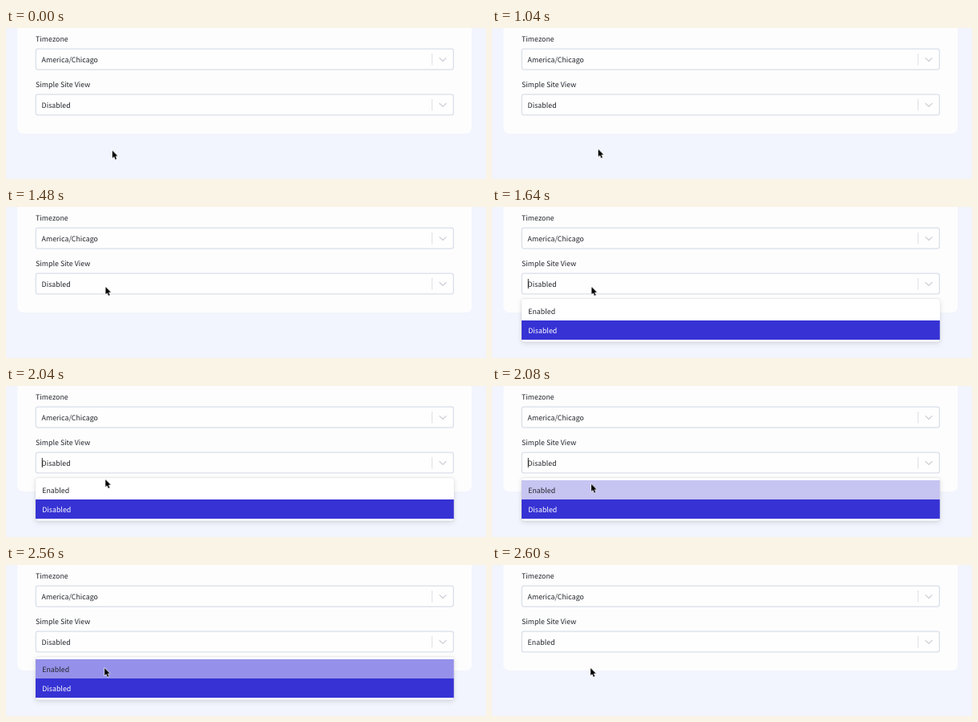
Write an HTML page that moves like this. It is 600 px wide and 189 px high and loops after 2720 ms.

```html
<!DOCTYPE html>
<html lang="en">
<head>
<meta charset="utf-8">
<title>Select menu</title>
<style>
  html, body { margin: 0; width: 100%; height: 100%; overflow: hidden; background: #f2f5fd; }
  svg { display: block; width: 100%; height: 100%; }
  text {
    font: 8.9px "Noto Sans CJK JP", "Noto Sans CJK SC", "Noto Sans CJK", "Open Sans", sans-serif;
    fill: #23252b;
    text-rendering: geometricPrecision;
  }
  .field { fill: #fefefe; stroke: #d9dfe8; stroke-width: 1.25; }
  .divider { stroke: #d3d6de; stroke-width: .8; }
  .chevron { fill: none; stroke: #cdd0d6; stroke-width: 1.3; stroke-linecap: round; stroke-linejoin: round; }
  .panel { fill: #fff; filter: drop-shadow(0 2.5px 3.2px rgba(0, 0, 0, .12)); }
  .edge { fill: none; stroke: rgba(0, 0, 0, .1); stroke-width: .6; }
  .selected { fill: #3632d4; }
  .light { fill: #fff; }

  .menu, .caret, .option, .before, .after, .cursor { animation: 2720ms step-end infinite; }
  .menu { animation-name: menu; }
  .caret { animation-name: caret; fill: #111; }
  .option { animation-name: option; }
  .before { animation-name: before; }
  .after { animation-name: after; }
  .cursor { animation-name: cursor; }

  @keyframes menu {
    0%, 95.588% { visibility: hidden; }
    60.294% { visibility: visible; }
    100% { visibility: hidden; }
  }
  @keyframes caret {
    0%, 79.411% { opacity: 0; }
    60.294% { opacity: 1; }
    100% { opacity: 0; }
  }
  @keyframes option {
    0% { fill: #fff; }
    76.47% { fill: #c6c4f1; }
    94.117%, 100% { fill: #9591ea; }
  }
  @keyframes before {
    0% { opacity: 1; }
    95.588%, 100% { opacity: 0; }
  }
  @keyframes after {
    0% { opacity: 0; }
    95.588%, 100% { opacity: 1; }
  }
  /* The pointer moves on a 40 ms grid. */
  @keyframes cursor {
    0% { transform: translate(133px, 153.5px); }
    36.764% { transform: translate(133px, 153.5px); animation-timing-function: steps(1); }
    38.235% { transform: translate(132.8px, 151.8px); animation-timing-function: steps(2); }
    41.176% { transform: translate(131.5px, 144.2px); animation-timing-function: steps(3); }
    45.588% { transform: translate(128.8px, 126.8px); animation-timing-function: steps(3); }
    50% { transform: translate(126px, 109.4px); animation-timing-function: steps(3); }
    54.411% { transform: translate(124.5px, 100px); }
    72.058% { transform: translate(124.5px, 100px); animation-timing-function: steps(2); }
    75% { transform: translate(124.3px, 117px); animation-timing-function: steps(3); }
    79.411% { transform: translate(123.8px, 134px); animation-timing-function: steps(1); }
    80.882% { transform: translate(123.7px, 135px); animation-timing-function: steps(3); }
    85.294% { transform: translate(123.2px, 129px); animation-timing-function: steps(2); }
    88.235% { transform: translate(123.2px, 128.3px); animation-timing-function: steps(3); }
    92.647%, 100% { transform: translate(123.2px, 129px); }
  }
</style>
</head>
<body>
<svg viewBox="0 0 600 189">
  <defs>
    <g id="select">
      <rect class="field" x="37.3" y="26.2" width="522" height="25.8" rx="2.4"/>
      <path class="divider" d="M532.6 32V46.5"/>
      <path class="chevron" d="M542 37.6L546 41.5L550 37.6"/>
    </g>
  </defs>

  <rect x="14.3" y="-20" width="567.7" height="152" rx="7" fill="#fdfdfe"/>

  <text x="37" y="17">Timezone</text>
  <use href="#select"/>
  <text x="44.6" y="42.7">America/Chicago</text>

  <text x="37" y="73.8">Simple Site View</text>
  <use href="#select" y="56.9"/>
  <text class="before" x="44.6" y="99.6">Disabled</text>
  <text class="after" x="44.6" y="99.6">Enabled</text>
  <rect class="caret" x="44.8" y="90" width=".9" height="12"/>

  <g class="menu">
    <rect class="panel" x="37" y="115" width="522.8" height="53.8" rx="2.4"/>
    <rect class="edge" x="36.8" y="114.8" width="523.2" height="54.2" rx="2.6"/>
    <rect class="option" x="37" y="118" width="522.8" height="24.2"/>
    <rect class="selected" x="37" y="142" width="522.8" height="24.2"/>
    <text x="45.2" y="133.6">Enabled</text>
    <text class="light" x="45.2" y="157.8">Disabled</text>
  </g>

  <path class="cursor" d="M0 0V9.3L2.1 7.3L3.7 10.9L5.3 10.2L3.7 6.7H6.6Z"
    fill="#000" stroke="#fff" stroke-width="1.2" stroke-linejoin="round" paint-order="stroke"/>
</svg>
</body>
</html>
```
